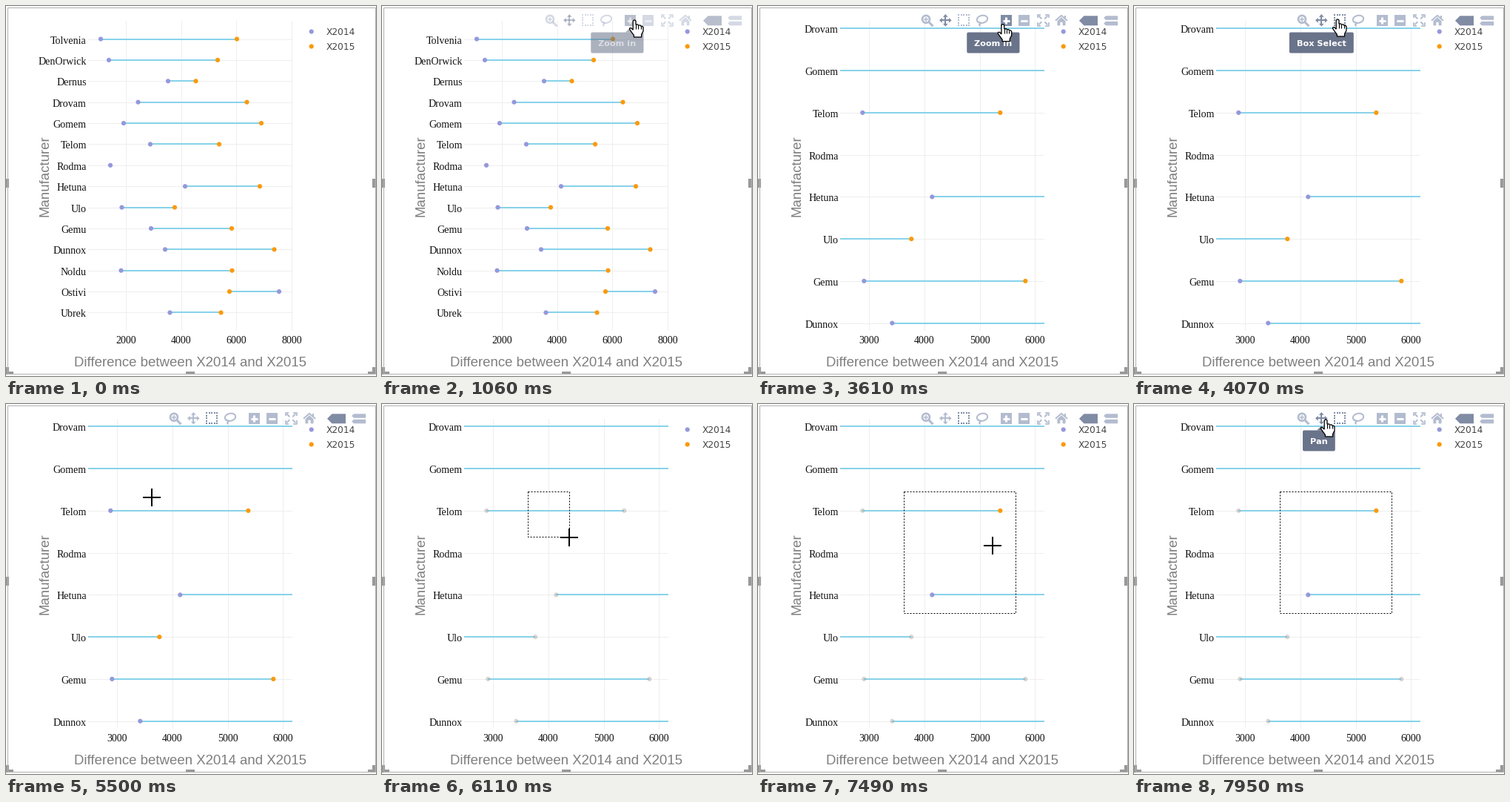
These frames come from a looping animation (500 by 499 pixels, 8000 ms). A matplotlib script:

```python
import numpy as np
import matplotlib.pyplot as plt
from matplotlib.animation import FuncAnimation
from matplotlib.patches import Circle, Ellipse, FancyBboxPatch, Polygon, Rectangle

W, H, DPI = 500, 499, 128
PX = 72 / DPI
STEP, LOOP = 40, 8000

NAMES = ["Tolvenia", "DenOrwick", "Dernus", "Drovam", "Gomem", "Telom", "Rodma",
         "Hetuna", "Ulo", "Gemu", "Dunnox", "Noldu", "Ostivi", "Ubrek"]
X2014 = np.array([1080, 1375, 3521, 2435, 1911, 2877, 1429,
                  4138, 1844, 2904, 3414, 1818, 7544, 3588], float)
X2015 = np.array([6015, 5318, 4527, 6378, 6901, 5372, np.nan,
                  6847, 3762, 5828, 7370, 5841, 5747, 5439])
ROWS = np.arange(len(NAMES))

LILAC, ORANGE, SKY = "#9598db", "#fa9a0a", "#87d2ea"
IDLE, LIT, TIP = "#b3bccf", "#808ba4", "#69738a"
DIM = (0.64, 0.62, 0.58, 0.42)

# Times of the events, in ms
ENTER, ZOOM, SELECT_MODE, DRAG, DROP, RELEASE = 870, 2130, 4710, 5800, 6520, 6660
PATH = [(870, 498, 130), (1060, 341, 19), (1290, 333, 27), (1720, 333, 27),
        (1750, 333, 25), (3560, 333, 25), (4060, 275, 18), (4990, 275, 18),
        (5500, 197, 126), (5780, 196.5, 117.5), (DRAG, 196.5, 117.5),
        (DROP, 348, 282.5), (7210, 348, 282.5), (7940, 259, 21)]

fig = plt.figure(figsize=(W / DPI, H / DPI), dpi=DPI, facecolor="white")
plot = fig.add_axes([110.8 / W, 1 - 438 / H, 275.8 / W, 418 / H], zorder=1)
plot.spines[:].set_visible(False)
plot.tick_params(length=0, labelleft=False, labelbottom=False)
plot.set_axisbelow(True)
plot.grid(color="#eeeeee", lw=PX)
plot.set_yticks(ROWS)
plot.hlines(ROWS, X2014, X2015, color=SKY, lw=2 * PX, zorder=2)
dots = [(vals, color, plot.scatter(vals, ROWS, s=(6.2 * PX) ** 2, c=color, lw=0, zorder=3))
        for vals, color in ((X2014, LILAC), (X2015, ORANGE))]

stage = fig.add_axes([0, 0, 1, 1], zorder=2)
stage.set(xlim=(0, W), ylim=(H, 0))
stage.axis("off")


def text(x, y, s, font, size, **kw):
    kw.setdefault("va", "baseline")
    return stage.text(x, y, s, family=font, fontsize=size * PX, **kw)


def line(pts, width=1, color=IDLE, **kw):
    x, y = zip(*pts)
    kw.setdefault("solid_capstyle", "butt")
    return stage.plot(x, y, lw=width * PX, color=color, **kw)[0]


def shape(patch):
    return stage.add_patch(patch)


def poly(pts, color=IDLE, **kw):
    kw.setdefault("lw", 0)
    return shape(Polygon(pts, fc=color, **kw))


def box(x, y, w, h, color=IDLE):
    return shape(Rectangle((x, y), w, h, fc=color, lw=0))


# Focus frame with resize handles
for a, b in (((1.5, 1.5), (498.5, 1.5)), ((1.5, 495.5), (498.5, 495.5)),
             ((1.5, 1.5), (1.5, 495.5)), ((498.5, 1.5), (498.5, 495.5))):
    line([a, b], 1, "#b0b0b0")
for r in ((0, 233, 4, 12), (495, 233, 5, 12), (243, 493, 12, 4), (0, 493, 10, 4),
          (0, 487, 4, 10), (489, 493, 10, 4), (495, 487, 4, 10)):
    box(*r, "#999999")

# Axis titles, labels and legend
GREY = "#7f7f7f"
text(249, 486, "Difference between X2014 and X2015", "Liberation Sans", 18.67,
     color=GREY, ha="center")
text(62, 229, "Manufacturer", "Liberation Sans", 18.67, color=GREY,
     rotation=90, ha="right", va="center")
row_labels = [text(108.7, 0, n, "Liberation Serif", 14, ha="right", color="#111111")
              for n in NAMES]
tick_labels = [text(0, 455, "", "Liberation Serif", 14, ha="center", color="#111111")
               for _ in range(4)]
for y, name, color in ((34.5, "X2014", LILAC), (54.5, "X2015", ORANGE)):
    shape(Circle((412.7, y), 3.1, fc=color, lw=0))
    text(433, y + 4.5, name, "DejaVu Sans", 12.3, color="#444444")


# Mode bar icons
def zoom_icon(x, y):
    return [shape(Circle((x - 1.5, y - 1.5), 5, fill=False, ec=IDLE, lw=2.6 * PX)),
            line([(x + 2, y + 2), (x + 8, y + 8)], 3),
            line([(x - 4.5, y - 1.5), (x + 1.5, y - 1.5)], 1.6),
            line([(x - 1.5, y - 4.5), (x - 1.5, y + 1.5)], 1.6)]


def pan_icon(x, y):
    parts = [line([(x - 6, y), (x + 6, y)], 2), line([(x, y - 6), (x, y + 6)], 2)]
    for dx, dy in ((1, 0), (-1, 0), (0, 1), (0, -1)):
        bx, by = x + 4.5 * dx, y + 4.5 * dy
        parts.append(poly([(x + 8.3 * dx, y + 8.3 * dy), (bx + 3.4 * dy, by + 3.4 * dx),
                           (bx - 3.4 * dy, by - 3.4 * dx)]))
    return parts


def box_icon(x, y):
    parts = []
    for i in range(5):
        d = -8 + 3.5 * i
        parts += [box(x + d, y - 8, 2, 2), box(x + d, y + 6, 2, 2)]
        if 0 < i < 4:
            parts += [box(x - 8, y + d, 2, 2), box(x + 6, y + d, 2, 2)]
    return parts


def lasso_icon(x, y):
    return [shape(Ellipse((x, y - 1.5), 14.5, 10, angle=-12, fill=False, ec=IDLE, lw=2 * PX)),
            line([(x - 5, y + 2), (x - 2, y + 4), (x - 4, y + 6), (x - 3, y + 8)], 2)]


def square_icon(x, y):
    return [box(x - 7.5, y - 7, 15, 15)]


def auto_icon(x, y):
    parts = []
    for sx in (-1, 1):
        for sy in (-1, 1):
            parts += [line([(x + 2 * sx, y + 2 * sy), (x + 6 * sx, y + 6 * sy)], 2),
                      line([(x + 3 * sx, y + 7.3 * sy), (x + 7.3 * sx, y + 7.3 * sy),
                            (x + 7.3 * sx, y + 3 * sy)], 1.7)]
    return parts


def home_icon(x, y):
    return [line([(x - 8, y + 0.5), (x, y - 6.5), (x + 8, y + 0.5)], 2),
            poly([(x - 5.5, y + 1), (x, y - 4), (x + 5.5, y + 1), (x + 5.5, y + 7),
                  (x + 1.7, y + 7), (x + 1.7, y + 2.5), (x - 1.7, y + 2.5),
                  (x - 1.7, y + 7), (x - 5.5, y + 7)]),
            box(x + 3.5, y - 6, 2, 4)]


def tag(x0, x1, y0, y1):
    m, d = (y0 + y1) / 2, (y1 - y0) / 2
    return poly([(x0, m), (x0 + d, y0), (x1, y0), (x1, y1), (x0 + d, y1)])


def tag_icon(x, y):
    return [tag(x - 12.5, x + 12.5, y - 6, y + 7)]


def tags_icon(x, y):
    return [tag(x - 9.5, x + 9.5, y - 6, y - 0.5), tag(x - 9.5, x + 9.5, y + 1.5, y + 7)]


BAR_Y = 19.3
BUTTONS = [("Zoom", 228.5, zoom_icon), ("Pan", 253.3, pan_icon),
           ("Box Select", 278.3, box_icon), ("Lasso Select", 303, lasso_icon),
           ("Zoom in", 335, square_icon), ("Zoom out", 359.7, square_icon),
           ("Autoscale", 385.3, auto_icon), ("Reset axes", 410, home_icon),
           ("Show closest data on hover", 446.5, tag_icon),
           ("Compare data on hover", 476.7, tags_icon)]
icons = {name: draw(x, BAR_Y) for name, x, draw in BUTTONS}
signs = [line([(x - 4.5, 19.8), (x + 4.5, 19.8)], 3, "white") for x in (335, 359.7)]
signs.append(line([(335, 15.3), (335, 24.3)], 3, "white"))

# Tooltip
tip_box = shape(FancyBboxPatch((0, 36), 10, 27.5, fc=TIP, lw=0, zorder=5,
                               boxstyle="round,pad=0,rounding_size=2"))
tip_arrow = poly([(0, 0)] * 3, TIP, zorder=5)
tip_text = text(0, 53.5, "", "DejaVu Sans", 11.2, weight="bold", color="white",
                ha="right", zorder=6)
tip = [tip_box, tip_arrow, tip_text]

# Selection outline and pointers
outline = [line([(0, 0)] * 5, 1, "white", zorder=7),
           line([(0, 0)] * 5, 1, "black", zorder=7, linestyle=(0, (2, 2)))]
HAND = np.array([(-1.8, 1.2), (-0.5, 0), (0.8, 0), (2, 1.2), (2, 6), (4.5, 6), (5.5, 7),
                 (8, 7), (9, 8.2), (10.7, 8.2), (12, 9.6), (12, 15), (9.6, 19.5),
                 (9.6, 23), (-0.6, 23), (-0.6, 20.5), (-3.6, 16.5), (-6.4, 12.4),
                 (-6.2, 10.8), (-4.4, 10.6), (-1.8, 13.2)])
CREASES = [np.array([(x, y), (x, 12)]) for x, y in ((2, 5), (5.4, 7), (8.8, 8))]
hand = poly(HAND, "white", ec="black", lw=1.3 * PX, zorder=9)
creases = [line(c, 1.1, "black", zorder=10) for c in CREASES]
CROSS = [np.array([(-12, 0), (12, 0)]), np.array([(0, -12), (0, 12)])]
cross = [line(c, 2, "black", zorder=9) for c in CROSS]


def smooth(u):
    u = np.clip(u, 0, 1)
    return u * u * (3 - 2 * u)


def ease_out(t, start):
    return 1 - (1 - np.clip((t - start) / 300, 0, 1)) ** 2


def pointer(t):
    for (t0, *a), (t1, *b) in zip(PATH, PATH[1:]):
        if t <= t1:
            u = smooth((t - t0) / (t1 - t0))
            return np.array(a) * (1 - u) + np.array(b) * u
    return np.array(PATH[-1][1:], float)


def bar_alpha(t):
    if t < DRAG:
        return ease_out(t, 960)
    return 1 - ease_out(t, DRAG) if t < RELEASE else ease_out(t, RELEASE)


def to_stage(value, row):
    x, y = plot.transData.transform((value, row))
    return x, H - y


def show(artists, on):
    for a in artists:
        a.set_visible(bool(on))


def draw_chart(zoomed):
    k = 0.5 if zoomed else 1
    ticks = (3000, 4000, 5000, 6000) if zoomed else (2000, 4000, 6000, 8000)
    plot.set_xticks(ticks)
    plot.set_xlim(4317.4 - 3698.8 * k, 4317.4 + 3698.8 * k)
    plot.set_ylim(6.5 + 7.364 * k, 6.5 - 7.364 * k)
    for label, v in zip(tick_labels, ticks):
        label.set_text(str(v))
        label.set_x(to_stage(v, 0)[0])
    for row, label in enumerate(row_labels):
        y = to_stage(0, row)[1]
        label.set_y(y + 6)
        label.set_visible(20 < y < 438)


def draw_selection(t):
    on = t > DRAG
    x0, y0 = 196.5, 117.5
    x1, y1 = pointer(min(t, DROP)) - (0, 0.8)
    show(outline, on)
    for o in outline:
        o.set_data([x0, x1, x1, x0, x0], [y0, y0, y1, y1, y0])
    for vals, color, artist in dots:
        colors = []
        for row, v in enumerate(vals):
            x, y = to_stage(v, row)
            colors.append(DIM if on and not (x0 < x < x1 and y0 < y < y1) else color)
        artist.set_facecolor(colors)


def draw_bar(t, pos):
    alpha = bar_alpha(t)
    hover = None
    if t >= ENTER and pos[1] < 31:
        hover = next((b for b in BUTTONS if abs(pos[0] - b[1]) < 12.5), None)
    lit = {"Show closest data on hover", "Box Select" if t >= SELECT_MODE else "Pan"}
    if hover:
        lit.add(hover[0])
    for name, parts in icons.items():
        for p in parts:
            color = LIT if name in lit else IDLE
            if isinstance(p, (Circle, Ellipse)):
                p.set_edgecolor(color)
            else:
                p.set_color(color)
            p.set_alpha(alpha)
    for s in signs:
        s.set_alpha(alpha)
    show(tip, hover)
    if hover:
        name, x, _ = hover
        tip_text.set_text(name)
        tip_text.set_x(x + 8.5)
        w = tip_text.get_window_extent().width + 20
        tip_box.set_bounds(x + 18.5 - w, 35.5, w, 28)
        tip_arrow.set_xy([(x, 29.5), (x + 6, 35.5), (x - 6, 35.5)])
        for a in tip:
            a.set_alpha(alpha)


def draw_pointer(t, pos):
    crossed = t >= SELECT_MODE and pos[1] > 31
    show([hand, *creases], t >= ENTER and not crossed)
    show(cross, crossed)
    hand.set_xy(HAND + pos)
    for part, pts in zip(creases + cross, CREASES + CROSS):
        part.set_data(*(pts + pos).T)


def update(i):
    t = (i + 0.5) * STEP
    pos = pointer(max(t, ENTER))
    draw_chart(t >= ZOOM)
    draw_selection(t)
    draw_bar(t, pos)
    draw_pointer(t, pos)
    return []


anim = FuncAnimation(fig, update, frames=LOOP // STEP, interval=STEP,
                     repeat=True, repeat_delay=0, blit=False)
plt.show()
```
